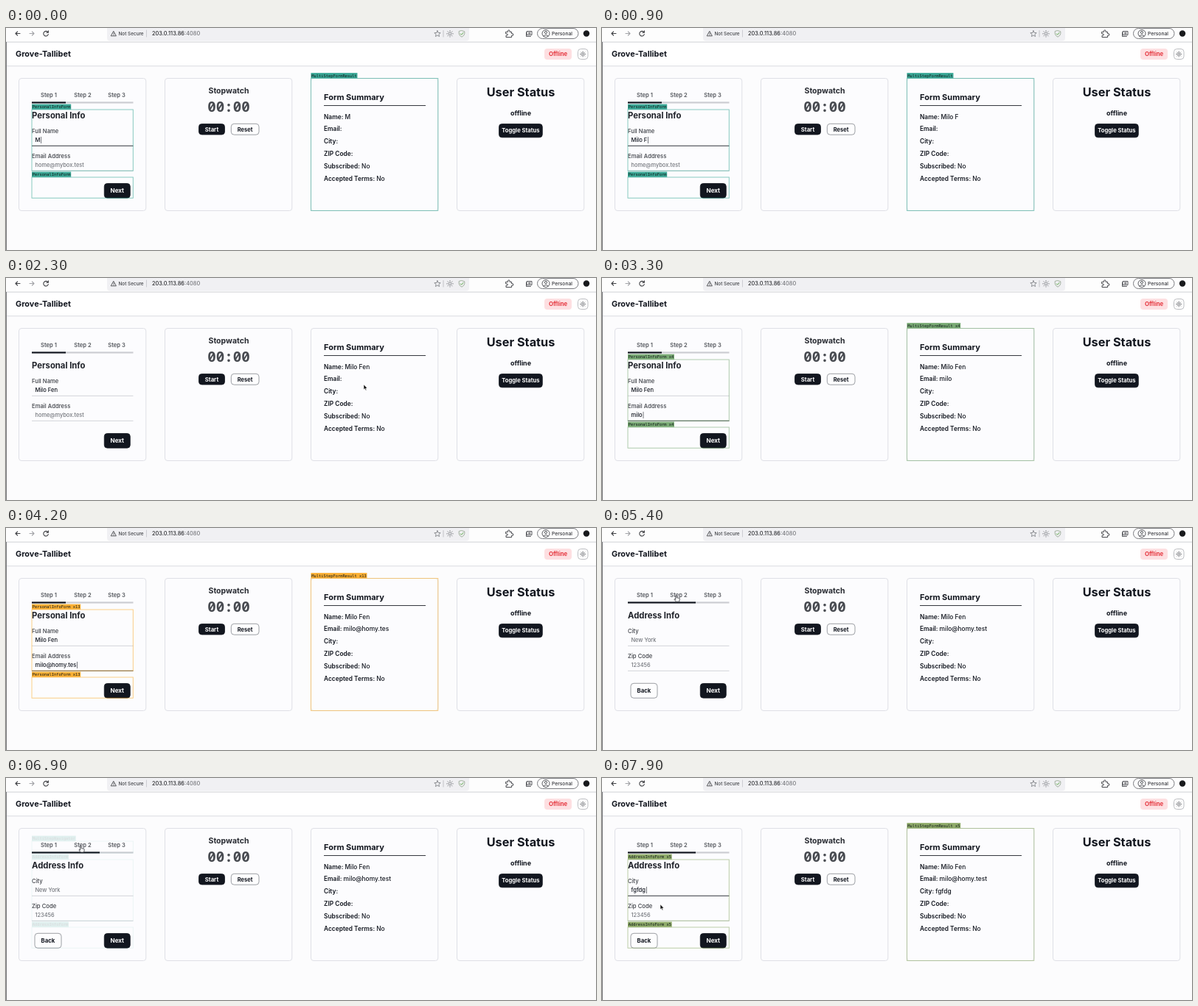
An HTML page that plays this animation: 800 px wide and 302 px high, repeating every 8000 ms.

```html
<!DOCTYPE html>
<html lang="en">
<head>
<meta charset="utf-8">
<title>Form demo</title>
<style>
  html, body { margin: 0; width: 100%; height: 100%; overflow: hidden; background: #fcfcfd; }
  svg { display: block; width: 800px; height: 302px; font-family: Inter, "Open Sans", sans-serif; }
  text { white-space: pre; }
  .mono { font-family: "DejaVu Sans Mono", monospace; }
  .digits { font-family: "Noto Sans Mono", monospace; }
</style>
</head>
<body>
<svg id="stage" viewBox="0 0 800 302"></svg>
<script>
const LOOP = 8000, STEP = 100;
const INK = '#12161f', GREY = '#54575d';
const NAME = 'Milo Fen', MAIL = 'milo@homy.test', CITY = 'fgfdg';
const SWITCH = 5400;

const every = (start, gap, n) => Array.from({ length: n }, (_, i) => start + gap * i);
const nameKeys = [0, 200, 400, 500, 700, 900, 1100, 1200];
const mailKeys = every(3000, 100, MAIL.length);
const cityKeys = [7600, 7700, 7800, 7800, 7900];

// Pointer path: time, x, y
const pathA = [[1800, 75, 152], [2200, 485, 145], [2600, 485, 145], [2900, 80, 186]];
const pathB = [[4600, 85, 187], [5200, 101, 92], [6000, 102, 93], [6900, 102, 93],
  [7200, 74, 152], [7300, 74, 152], [7400, 79, 172]];

const text = (x, y, s, size, weight = 400, fill = INK, extra = '') =>
  `<text x="${x}" y="${y}" font-size="${size}" font-weight="${weight}" fill="${fill}" ${extra}>${s}</text>`;
const mid = (x, y, s, size, weight, fill) => text(x, y, s, size, weight, fill, 'text-anchor="middle"');
const rect = (x, y, w, h, fill, r = 0, stroke = 'none', extra = '') =>
  `<rect x="${x}" y="${y}" width="${w}" height="${h}" rx="${r}" fill="${fill}" stroke="${stroke}" ${extra}/>`;
const path = (d, stroke, w = 1, fill = 'none') =>
  `<path d="${d}" stroke="${stroke}" stroke-width="${w}" fill="${fill}" stroke-linecap="round" stroke-linejoin="round"/>`;
const button = (x, y, w, h, s, dark, size = 7.8) =>
  rect(x, y, w, h, dark ? INK : '#fdfdfe', 4, dark ? INK : '#85888f', 'stroke-width=".8"') +
  mid(x + w / 2, y + h / 2 + 2.8, s, size, 650, dark ? '#fff' : INK);

function sun(x, y, r, color) {
  let d = '';
  for (let i = 0; i < 8; i++) {
    const c = Math.cos(i * Math.PI / 4), s = Math.sin(i * Math.PI / 4);
    d += `M${x + c * r * .72} ${y + s * r * .72}L${x + c * r} ${y + s * r}`;
  }
  return path(d, color, .8) + `<circle cx="${x}" cy="${y}" r="${r * .4}" fill="none" stroke="${color}" stroke-width=".8"/>`;
}

function star(x, y, r) {
  const pts = every(0, 1, 10).map(i => {
    const a = i * Math.PI / 5 - Math.PI / 2, k = i % 2 ? r * .45 : r;
    return `${x + k * Math.cos(a)} ${y + k * Math.sin(a)}`;
  });
  return path('M' + pts.join('L') + 'Z', '#77797e', .8);
}

function toolbar() {
  return rect(0, 0, 800, 19, '#fdfdfd') +
    rect(137, -8, 491, 25.5, '#f0f0f3', 4) +
    path('M19 7.5H13M15.6 4.8L13 7.5L15.6 10.2', '#3c3d41', 1.1) +
    path('M32 7.5H38M35.4 4.8L38 7.5L35.4 10.2', '#a2a3a7', 1.1) +
    path('M57 6A3.3 3.3 0 1 0 57.3 8.6M57.4 3.8V6.3H55', '#3c3d41', 1.1) +
    path('M146 4.6L149.4 10.8H142.6Z', '#4b4c50', .9) + path('M146 6.8V8.4M146 9.6V9.7', '#4b4c50', .8) +
    text(152.5, 10.2, 'Not Secure', 6.4, 550, '#3f4045') +
    path('M190.5 3V12', '#c4c5ca', .8) +
    text(198, 10.3, '203.0.113.86<tspan fill="#77787d">:4080</tspan>', 7.4, 450, '#2c2d31') +
    star(585, 8, 4.4) + path('M593 3.5V12', '#b4b5ba', .8) + sun(602, 7.8, 4.4, '#77797e') +
    path('M618 3.6L621.8 4.8V7.6Q621.4 10.6 618 12.2Q614.6 10.6 614.2 7.6V4.8Z', '#8fa08a', .8) +
    path('M616.2 7.8L617.6 9.2L620 6.4', '#5aa648', 1) +
    path('M678 5.3H680.6Q680 2.8 681.8 2.8T683 5.3H685.6V7.7Q688 7.2 688 9T685.6 10.2V12.6H678V10.2Q680.4 10.4 680.4 9T678 7.7Z', '#45464b', 1) +
    path('M706.5 4.5H713V9.5H706.5ZM705.5 6V11.5H711.5M708.5 6.3H711M708.5 7.8H711', '#45464b', .9) +
    rect(720.5, .5, 55.5, 14, '#fdfdfd', 7, '#6d6e73', 'stroke-width=".9"') +
    '<circle cx="732" cy="7.5" r="5" fill="none" stroke="#45464b" stroke-width=".9"/>' +
    '<circle cx="732" cy="6" r="1.6" fill="none" stroke="#45464b" stroke-width=".9"/>' +
    path('M729 10.8Q732 7.8 735 10.8', '#45464b', .9) +
    text(740, 10, 'Personal', 6.7, 500, '#303136') +
    '<circle cx="787" cy="7.5" r="4.2" fill="#18191c"/>' +
    rect(0, 18.5, 800, 1.3, '#dcdde0');
}

function backdrop() {
  const cards = [17.5, 215.5, 413.5, 611.5].map(x => rect(x, 68.5, 172.3, 180, '#fcfcfe', 3.5, '#dfe0e6'));
  return rect(0, 0, 800, 302, '#fcfcfd') + toolbar() +
    rect(0, 20, 800, 31, '#fff') + rect(0, 51, 800, 1, '#e3e4e8') + rect(0, 52, 800, 1, '#f3f3f6') +
    rect(0, 19, 1, 283, '#77787b') +
    text(13, 39.2, 'Grove-Tallibet', 10.9, 700) +
    rect(730, 28, 37, 15, '#fddfe1', 4) + mid(748.5, 38.2, 'Offline', 7.8, 600, '#e3262f') +
    rect(775.5, 28.5, 13.5, 14, '#fff', 4, '#b5b7bc', 'stroke-width=".9"') + sun(782.2, 35.5, 3.6, '#55575c') +
    cards.join('') +
    mid(302, 88.7, 'Stopwatch', 10.5, 650, '#272a31') +
    mid(302, 113.8, '<tspan class="digits">00:00</tspan>', 19.2, 600, '#474a50') +
    button(261.5, 130.5, 35, 14.5, 'Start', true, 7.7) + button(305.3, 130.3, 37.7, 14.9, 'Reset', false, 7.5) +
    text(431, 97.6, 'Form Summary', 11, 650) + rect(431, 105, 138, 1, '#35383f') +
    mid(698, 92.8, 'User Status', 16.3, 700) + mid(698, 118.6, 'offline', 9, 700) +
    button(668.5, 130.5, 58.8, 18.3, 'Toggle Status', true, 7.6);
}

const typed = (s, keys, t) => s.slice(0, keys.filter(k => k <= t).length);

function field(y, label, value, hint, focused) {
  const caret = focused ? '<tspan font-weight="400">|</tspan>' : '';
  const line = focused ? '#34373d' : '#d3d4d9';
  return text(35, y, label, 7.7, 550, '#3c3f45') +
    (value || focused ? text(39.5, y + 12.3, value + caret, 7.6, 550) : text(39.5, y + 12.3, hint, 7.4, 450, '#74777d')) +
    rect(35, y + 16.8, 137.5, 1, line);
}

function form(t) {
  const second = t >= SWITCH;
  const tabs = [58, 104, 150].map((x, i) => mid(x, 93.9, 'Step ' + (i + 1), 7.6, 600, GREY)).join('');
  const bar = rect(35, 100.4, 137.5, 2.1, '#cbccd1') + rect(35, 100.4, second ? 92 : 46, 2.1, INK);
  const fields = second
    ? field(143, 'City', typed(CITY, cityKeys, t), 'New York', t >= 7300) +
      field(177, 'Zip Code', '', '123456', false) + button(39, 211.3, 36, 20, 'Back', false)
    : field(143, 'Full Name', typed(NAME, nameKeys, t), '', t < 2100) +
      field(177, 'Email Address', typed(MAIL, mailKeys, t), 'home@mybox.test', t >= 2900 && t < 5200);
  return tabs + bar + text(35, 122.8, second ? 'Address Info' : 'Personal Info', 11.3, 650, '#1f2229') +
    fields + button(133.3, 211.5, 35, 19.7, 'Next', true, 8.1);
}

function summary(t) {
  const rows = [['Name', typed(NAME, nameKeys, t)], ['Email', typed(MAIL, mailKeys, t)],
    ['City', typed(CITY, cityKeys, t)], ['ZIP Code', ''], ['Subscribed', 'No'], ['Accepted Terms', 'No']];
  return rows.map(([k, v], i) =>
    text(431, 123.5 + 16.9 * i, `${k}: <tspan font-weight="500">${v}</tspan>`, 8.4, 620)).join('');
}

function tag(x, y, w, h, name, count, color) {
  const s = count > 1 ? `${name} x${count}` : name;
  return rect(x, y, w, h, 'none', 0, color, 'stroke-width=".9" stroke-opacity=".65"') +
    rect(x, y - 7.4, s.length * 3.25 + 1.2, 7.2, color) +
    text(x + .7, y - 1.9, s, 5.4, 400, '#10191a', 'class="mono"');
}

// Render outlines: tint warms with the count, then everything fades
function outlines(t) {
  const bursts = [
    { from: 0, last: 1200, name: 'PersonalInfoForm', count: 1, result: true },
    { from: 3000, last: 4300, name: 'PersonalInfoForm', count: typed(MAIL, mailKeys, t).length, result: true },
    { from: 6200, last: 6300, name: 'AddressInfoForm', count: 1, nav: true },
    { from: 7600, last: 7900, name: 'AddressInfoForm', count: typed(CITY, cityKeys, t).length, result: true }
  ];
  const b = bursts.find(b => t >= b.from && t < b.last + 700);
  if (!b) return '';
  const k = Math.min(1, (b.count - 1) / 9);
  const color = `rgb(${[[58, 168, 150], [251, 176, 52]].reduce((p, q) => p.map((v, i) => Math.round(v + (q[i] - v) * k)))})`;
  const alpha = 1 - Math.max(0, t - b.last) / 700;
  return `<g opacity="${alpha}">` +
    tag(35, 111, 137.3, 83.2, b.name, b.count, color) + tag(35, 203, 137.3, 28.3, b.name, b.count, color) +
    (b.nav ? tag(35, 86, 137.3, 16, 'MultiStepNavigator', 1, color) : '') +
    (b.result ? tag(413.5, 68.5, 172.3, 180, 'MultiStepFormResult', b.count, color) : '') + '</g>';
}

function along(points, t) {
  const i = points.findIndex(p => p[0] > t);
  if (i < 0) return points[points.length - 1].slice(1);
  const [t0, x0, y0] = points[i - 1], [t1, x1, y1] = points[i];
  const u = (t - t0) / (t1 - t0), e = u * u * (3 - 2 * u);
  return [x0 + (x1 - x0) * e, y0 + (y1 - y0) * e];
}

function pointer(t) {
  const points = t >= 1800 && t < 3000 ? pathA : t >= 4600 ? pathB : null;
  if (!points) return '';
  const [x, y] = along(points, t);
  const hand = points === pathB && y < 101;
  const shape = hand
    ? path('M-1.4 4.6V-.2Q-.7-1.1 0-.2V2.6L3.6 3.3Q4.4 3.8 4.2 5L3.6 8H-.8L-3.2 5Q-3.2 3.7-1.4 4.8Z', '#33353a', .8, '#fff')
    : path('M0 0V6.8L1.6 5.4L2.7 8L3.9 7.5L2.8 5H4.9Z', '#fff', .6, '#111');
  return `<g transform="translate(${x} ${y})">${shape}</g>`;
}

const stage = document.getElementById('stage');
stage.innerHTML = backdrop() + '<g id="live"></g>';
const live = document.getElementById('live');
let shown = -1;

function frame() {
  const t = Math.floor(performance.now() % LOOP / STEP) * STEP;
  if (t !== shown) {
    live.innerHTML = form(t) + summary(t) + outlines(t) + pointer(t);
    shown = t;
  }
  requestAnimationFrame(frame);
}
frame();
</script>
</body>
</html>
```
